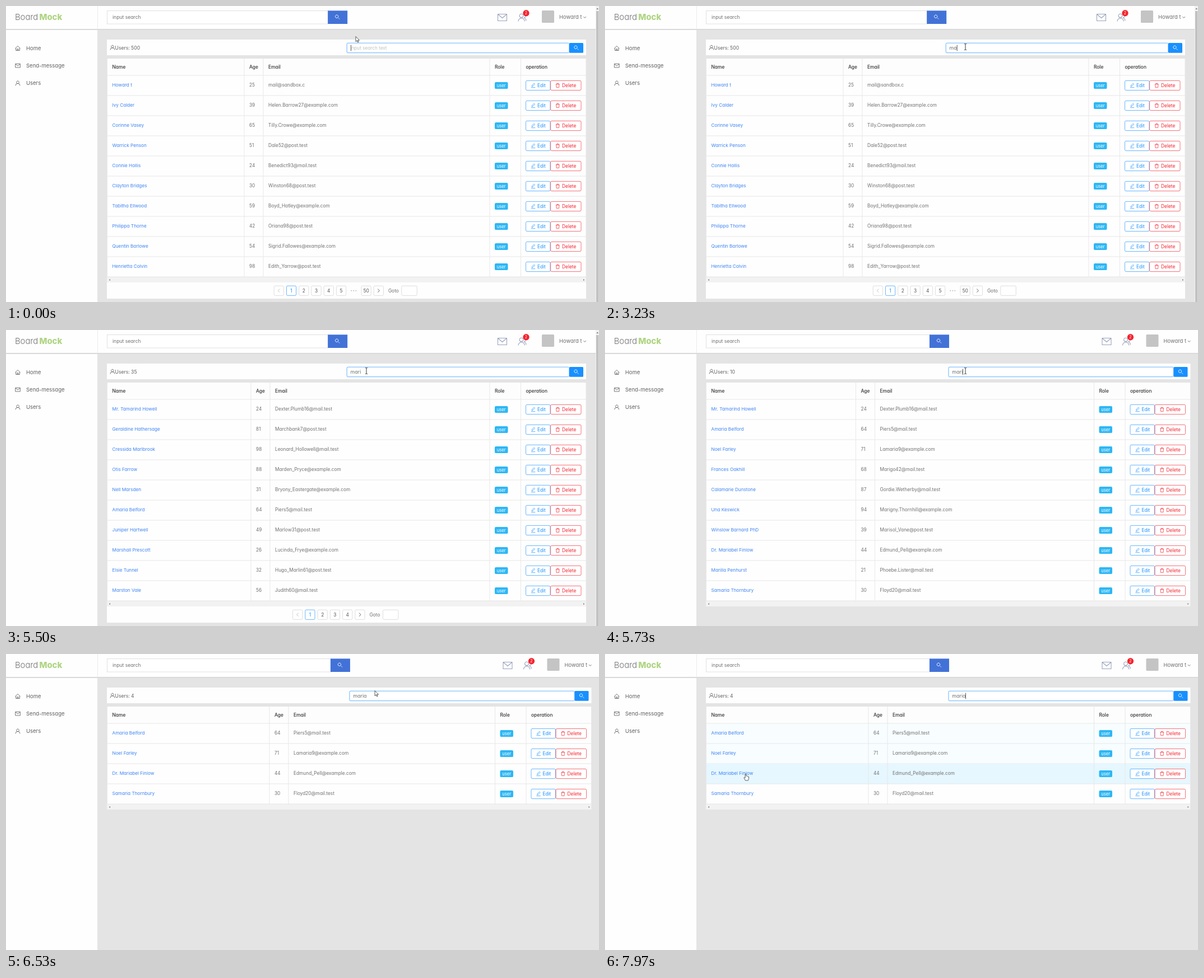
Animation, 1058 px wide and 529 px high, one loop 8000 ms. Source, as an HTML page:

```html
<!DOCTYPE html>
<html lang="en">
<head>
<meta charset="utf-8">
<title>User admin</title>
<style>
html, body { margin: 0; width: 100%; height: 100%; overflow: hidden; background: #e4e4e4; }
svg { display: block; width: 1058px; height: 529px; }
text { font-family: Inter, Lato, sans-serif; font-feature-settings: "cv11"; white-space: pre; }
</style>
</head>
<body>
<svg id="stage" viewBox="0 0 1058 529"></svg>
<script>
const LOOP = 8000, BLUE = '#1890ff', RED = '#f5222d', GREY = '#707070';
const stage = document.getElementById('stage');
const meter = document.createElement('canvas').getContext('2d');

const parse = s => s.trim().split('\n').map(r => r.split('|'));
const everyone = parse(`
Howard t|25|mail@sandbox.c
Ivy Calder|39|Helen.Barrow27@example.com
Corinne Vasey|65|Tilly.Crowe@example.com
Warrick Penson|51|Dale52@post.test
Connie Hollis|24|Benedict93@mail.test
Clayton Bridges|30|Winston68@post.test
Tabitha Ellwood|59|Boyd_Hatley@example.com
Philippa Thorne|42|Oriana98@post.test
Quentin Barlowe|54|Sigrid.Fallowes@example.com
Henrietta Colvin|98|Edith_Yarrow@post.test`);
const mar = parse(`
Mr. Tamarind Howell|24|Dexter.Plumb16@mail.test
Geraldine Hathersage|81|Marchbank7@post.test
Cressida Marlbrook|98|Leonard_Hollowell@mail.test
Otis Farrow|88|Marden_Pryce@example.com
Nell Marsden|31|Bryony_Eastergate@example.com
Amaria Belford|64|Piers5@mail.test
Juniper Hartwell|49|Marlow31@post.test
Marshall Prescott|26|Lucinda_Frye@example.com
Elsie Tunnel|32|Hugo_Marlin61@post.test
Marston Vale|56|Judith60@mail.test`);
const mari = [mar[0], mar[5], ...parse(`
Noel Farley|71|Lamaria9@example.com
Frances Oakhill|68|Marigo42@mail.test
Calamarie Dunstone|87|Gordie.Wetherby@mail.test
Una Keswick|94|Marigny.Thornhill@example.com
Winslow Barnard PhD|39|Marisol_Vane@post.test
Dr. Mariabel Finlow|44|Edmund_Pell@example.com
Marilla Penhurst|21|Phoebe.Lister@mail.test
Samaria Thornbury|30|Floyd20@mail.test`)];
const maria = [1, 2, 7, 9].map(i => mari[i]);

// start time, rows, total, x of the Age column, page buttons
const views = [
  [0, everyone, 500, 425, ['<', 1, 2, 3, 4, 5, '•••', 50, '>']],
  [4400, mar, 35, 437, ['<', 1, 2, 3, 4, '>']],
  [5730, mari, 10, 447.5],
  [6530, maria, 4, 470]
];
const typed = [[0, ''], [2720, 'm'], [3230, 'ma'], [3640, 'mar'], [4990, 'mari'], [5860, 'maria']];
const blinks = [0, 260, 790, 1330, 1840, 2380, 2720, 4150, 4710, 5500, 5730, 6390, 6920, 7450, 7970];
const path = [[0, 624, 54.5], [590, 624, 54.5], [870, 641, 72], [1050, 641, 72], [1130, 643, 73],
  [6240, 643, 73], [6470, 661.5, 63.5], [6530, 658.5, 65.5], [6760, 565, 83], [6980, 442, 112],
  [7150, 400, 124], [7400, 335, 160], [7650, 275, 196], [7870, 251, 214], [8000, 251, 214]];
const hovers = [[7150, 7400], [7400, 7650], [7650, 9e3]];

const clamp = v => Math.max(0, Math.min(1, v));
const at = (list, t) => list.filter(e => e[0] <= t).pop();
const T = (x, y, s, size = 8.3, fill = GREY, extra = '') =>
  `<text x="${x}" y="${y}" font-size="${size}" fill="${fill}" ${extra}>${String(s).replace('<', '&lt;')}</text>`;
const R = (x, y, w, h, fill, extra = '') =>
  `<rect x="${x}" y="${y}" width="${w}" height="${h}" fill="${fill}" ${extra}/>`;
const P = (d, stroke, w = 1, fill = 'none') =>
  `<path d="${d}" stroke="${stroke}" stroke-width="${w}" fill="${fill}" stroke-linejoin="round"/>`;
const G = (x, y, s) => `<g transform="translate(${x} ${y})">${s}</g>`;
// white box with a hairline border inside its edge
const box = (x, y, w, h, stroke) =>
  R(x + .3, y + .3, w - .6, h - .6, '#fff', `stroke="${stroke}" stroke-width=".65" rx="2"`);
const MID = 'text-anchor="middle"';

const icon = {
  lens: P('M2 2L4 4M-1 -3.5a2.7 2.7 0 1 0 .01 0z', '#fff', .9),
  user: P('M0 -4a2.3 2.3 0 1 0 .01 0zM-4 4.3a4 4 0 0 1 8 0', '#555', .8),
  home: P('M-4.5 .3L0 -4L4.5 .3M-3.3 -.5V4H3.3V-.5M-1 4V1.3H1V4', '#555', .8),
  mail: P('M-4.3 -3.2H4.3V3.4H-4.3zM-4 -2.6L0 .6L4 -2.6', '#555', .8),
  pen: P('M-2.4 1.7L-1.9 -.4L1.8 -3.8L3.1 -2.4L-.4 1.2zM-3.6 3.6H3.8', BLUE, .7),
  bin: P('M-3.4 -2.2H3.4M-1.4 -2.3V-3.6H1.4V-2.3M-2.6 -2.1L-2.3 3.4H2.3L2.6 -2.1', RED, .7),
  arrow: P('M0 0V9.2L2.2 7.2L3.7 10.4L5 9.8L3.6 6.7H6.5z', '#333', .8, '#fff'),
  beam: P('M-2 -5.5Q0 -5.5 0 -4.5Q0 -5.5 2 -5.5M0 -4.5V4.5M-2 5.5Q0 5.5 0 4.5Q0 5.5 2 5.5', '#222', .9),
  hand: P('M-.9 .6Q0 -.6 .9 .6V4Q2 3.3 2.6 4.4Q3.7 3.8 4.2 5Q5.4 4.6 5.5 6V8.4Q5 10.4 4.3 12H-.6Q-1.4 9.8 -3.2 7.4Q-3 5.8 -.9 7.4z', '#333', .8, '#fff')
};

function sidebar() {
  return R(0, 0, 163, 529, '#fefefe') + R(163, 0, 1, 529, '#e6e6e6') +
    [['Home', 'home', 75.5], ['Send-message', 'mail', 106.5], ['Users', 'user', 138]]
      .map(([s, i, y]) => G(21, y, icon[i]) + T(36, y + 3.4, s, 9.5, '#606060')).join('');
}

function header(d) {
  const edge = 574.2 + d / 2;
  return R(0, 41, 1058, 1, '#d4d4d4') + R(0, 42, 1058, 1, '#dedede') + R(0, 0, 1058, 41, '#fefefe') +
    R(163, 0, 1, 41, '#ececec') +
    T(16, 25, 'Board', 14.8, GREY, 'font-weight="300"') +
    T(59.5, 25, 'Mock', 14.8, '#aed581', 'font-weight="800"') +
    R(180.4, 8.6, edge - 180, 23.4, '#fff', 'stroke="#d9d9d9" stroke-width=".8"') +
    T(190, 23.3, 'input search', 8.6) +
    R(edge, 8.3, 35, 23.7, '#4272d7') + G(edge + 17, 19.5, icon.lens) +
    G(d, 0,
      P('M877.5 14.5H893.5V26.5H877.5zM878 15L885.5 21.5L893 15', '#9aa3bd', 1.1) +
      P('M919.5 14a3.4 3.4 0 1 0 .01 0zM914 27.5a5.6 5.6 0 0 1 11.4 0M923.5 14.8a3 3 0 1 1 .8 5.7M924 21.3Q928 22.2 928 26.5', '#9aa3bd', 1.1) +
      `<circle cx="928" cy="12.7" r="5.6" fill="${RED}"/>` + T(928, 15.2, 2, 7, '#fff', MID) +
      R(956, 8, 22, 22, '#c4c4c4', 'rx="1.5"') + T(987, 23, 'Howard t', 9.4) +
      P('M1030.5 19L1032.7 21.4L1034.9 19', GREY, .9));
}

function searchBar(d, total, word, caret) {
  const x = 608 + d / 2, end = 1005 + d, size = 8.9;
  meter.font = size + 'px Inter, Lato, sans-serif';
  const cx = x + 7 + meter.measureText(word).width;
  return R(180, 60, 855 + d, 28, '#fefefe') + G(190, 74.3, icon.user) + T(194.5, 77.5, 'Users: ' + total, 8.6, '#606060') +
    R(x - .6, 65.4, end - x + .6, 19, '#d1e9ff', 'rx="2.5"') + box(x, 66, end - x, 17.8, '#40a0ff') +
    (word ? T(x + 6.5, 77.8, word, size) : T(x + 6.5, 77.6, 'input search text', 8.2, '#bfbfbf')) +
    (caret ? R(cx, 69.5, .8, 11, '#333') : '') +
    R(end, 66, 25, 17.8, BLUE, 'rx="1.5"') + G(end + 12.5, 74.5, icon.lens);
}

function row(y, [name, age, mail], col, d, tint) {
  const m = y + 18;
  return (tint ? R(180, y, 855 + d, 36, '#e6f7ff', `opacity="${tint.toFixed(3)}"`) : '') +
    T(189.5, m + 2.3, name, 8.2, '#3c83f5') + T(col + 9, m + 2.3, age) + T(col + 43, m + 2.3, mail) +
    G(d, m,
      R(872, -6.1, 23.5, 12.2, '#2db7f5', 'rx="2.2"') + T(883.7, 2.6, 'user', 7.7, '#fff', MID) +
      box(927.2, -8.9, 44.1, 17.8, BLUE) + G(940.5, 0, icon.pen) + T(948, 3.2, 'Edit', 8.3, BLUE) +
      box(971.3, -8.9, 55, 17.8, RED) + G(984.3, 0, icon.bin) + T(992, 3.2, 'Delete', 8.4, RED)) +
    R(180, y + 35.5, 855 + d, 1, '#e8e8e8');
}

function table(rows, col, d, t) {
  const end = 124 + rows.length * 36, w = 855 + d;
  const head = [[189.5, 'Name'], [col + 9, 'Age'], [col + 43, 'Email'], [872 + d, 'Role'], [927.5 + d, 'operation']];
  const tint = i => hovers[i] && rows === maria
    ? clamp((t - hovers[i][0]) / 300) - .7 * clamp((t - hovers[i][1]) / 300) : 0;
  return R(180, 94, w, end - 94, '#fefefe') + R(180, 94, w, 30, '#fdfdfd') + R(180, 123.5, w, 1, '#e8e8e8') +
    head.map(([x, s]) => T(x, 111.7, s, 8.4, '#333', 'font-weight="500"')).join('') +
    rows.map((r, i) => row(124 + i * 36, r, col, d, tint(i))).join('') +
    [180, col - .5, col + 33.5, 862.5 + d, 918 + d, 1034.5 + d].map(x => R(x, 94, 1, end - 94, '#e8e8e8')).join('') +
    R(180, end + .5, w, 9.5, '#f2f2f2') +
    P(`M186 ${end + 4}v3l-2.2 -1.5z`, 'none', 0, '#777') +
    P(`M${1030 + d} ${end + 4}v3l2.2 -1.5z`, 'none', 0, '#777');
}

function pager(pages) {
  const step = 22.25, x0 = 605.8 - (pages.length * step + 55.5) / 2, gx = x0 + pages.length * step;
  return R(180, 494, 855, 29, '#fefefe') + pages.map((p, i) => {
    const x = x0 + i * step, mid = x + 8.9, on = p === 1;
    if (p === '•••') return [-4, 0, 4].map(k => `<circle cx="${mid + k}" cy="508.7" r="1" fill="#bbb"/>`).join('');
    const s = p === '<' ? -1 : 1;
    const mark = p === '<' || p === '>'
      ? P(`M${mid - 1.6 * s} 505.6L${mid + 1.6 * s} 508.7L${mid - 1.6 * s} 511.8`, s < 0 ? '#bbb' : '#555', .9)
      : T(mid, 511.7, p, 8.4, on ? BLUE : '#555', MID);
    return box(x, 499.9, 17.8, 17.8, on ? BLUE : '#ccc') + mark;
  }).join('') + T(gx + 3.7, 511.7, 'Goto', 8.4) + box(gx + 27.4, 499.9, 28, 17.8, '#ccc');
}

function pointer(t) {
  const i = Math.max(1, path.findIndex(p => p[0] > t));
  const [t0, x0, y0] = path[i - 1], [t1, x1, y1] = path[i];
  const k = (t - t0) / (t1 - t0), x = x0 + (x1 - x0) * k, y = y0 + (y1 - y0) * k;
  const overInput = x > 610 && y > 66 && y < 84;
  const overLink = x < 270 && y > 124 && Math.abs((y - 124) % 36 - 18) < 7;
  return G(x.toFixed(2), y.toFixed(2), icon[overInput ? 'beam' : overLink ? 'hand' : 'arrow']);
}

const scrollbar = () => R(1052, 0, 6, 529, '#f1f1f1') + R(1053, 9, 4.5, 520, '#c1c1c1') +
  P('M1053.3 6h3.8l-1.9 -2.4z', 'none', 0, '#777');

function draw(t) {
  const [, rows, total, col, pages] = at(views, t);
  const d = pages ? 0 : 9.5; // the page widens once its scrollbar goes
  const caret = blinks.filter(b => b <= t).length % 2;
  return R(0, 0, 1058, 529, '#e4e4e4') + sidebar() + header(d) +
    searchBar(d, total, at(typed, t)[1], caret) + table(rows, col, d, t) +
    (pages ? pager(pages) + scrollbar() : '') + pointer(t);
}

let last = '';
function tick() {
  const html = draw(performance.now() % LOOP);
  if (html !== last) stage.innerHTML = last = html;
  requestAnimationFrame(tick);
}
tick();
</script>
</body>
</html>
```
